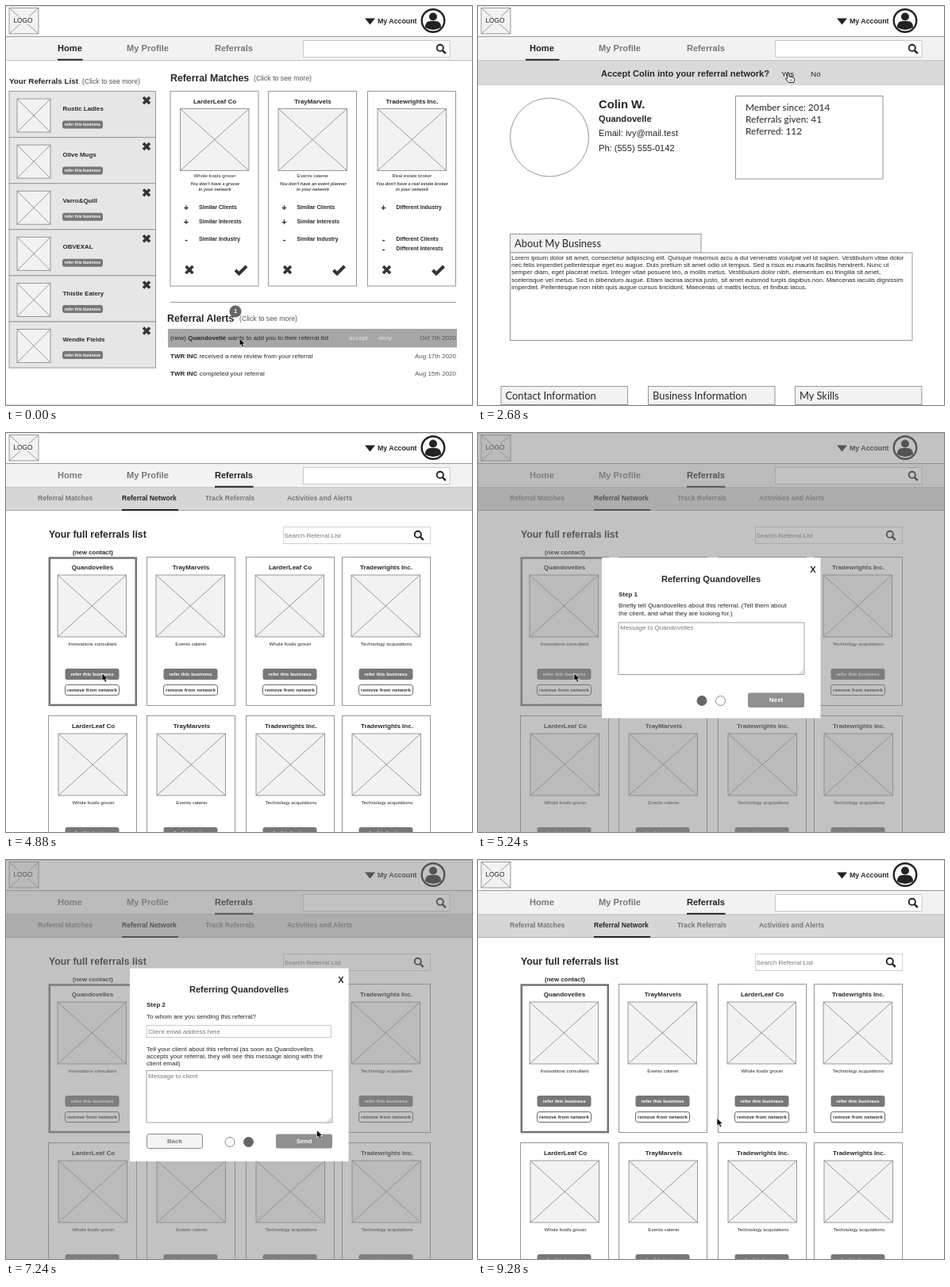
Write an HTML page that moves like this. It is 587 px wide and 503 px high and loops after 9.32 s.

```html
<!DOCTYPE html>
<html lang="en">
<head>
<meta charset="utf-8">
<title>Referral network wireframe</title>
<style>
html, body { margin: 0; width: 100%; height: 100%; overflow: hidden; background: #fff; }
svg { display: block; width: 587px; height: 503px; font-family: "Liberation Sans", Arial, sans-serif; }
.lato { font-family: Lato, sans-serif; }
</style>
</head>
<body>
<svg id="stage" viewBox="0 0 587 503" xmlns="http://www.w3.org/2000/svg"></svg>
<script>
const LOOP = 9320;
const DARK = '#262626', GREY = '#777', LINE = '#969696';

// Drawing helpers; text is placed by its vertical middle
const text = (x, y, size, str, o = {}) =>
  `<text x="${x}" y="${y + size * 0.33}" font-size="${size}" fill="${o.fill || DARK}"` +
  ` text-anchor="${o.anchor || 'start'}" font-weight="${o.bold ? 700 : 400}"` +
  `${o.italic ? ' font-style="italic"' : ''}${o.cls ? ` class="${o.cls}"` : ''}>${str}</text>`;
const bold = (x, y, size, str, o) => text(x, y, size, str, { bold: true, ...o });
const mid = (x, y, size, str, o) => text(x, y, size, str, { anchor: 'middle', ...o });
const midBold = (x, y, size, str, o) => mid(x, y, size, str, { bold: true, ...o });
const box = (x, y, w, h, fill, stroke = 'none', sw = 1, r = 0) =>
  `<rect x="${x}" y="${y}" width="${w}" height="${h}" rx="${r}" fill="${fill}" stroke="${stroke}" stroke-width="${sw}"/>`;
const path = (d, stroke, sw = 1, fill = 'none') =>
  `<path d="${d}" fill="${fill}" stroke="${stroke}" stroke-width="${sw}"/>`;
const circle = (x, y, r, fill, stroke = 'none', sw = 1) =>
  `<circle cx="${x}" cy="${y}" r="${r}" fill="${fill}" stroke="${stroke}" stroke-width="${sw}"/>`;
const picture = (x, y, w, h) => box(x, y, w, h, '#f2f2f2', '#808080', 0.8) +
  path(`M${x} ${y}l${w} ${h}M${x + w} ${y}l${-w} ${h}`, '#808080', 0.8);
const cross = (x, y, r) => path(`M${x - r} ${y - r}l${2 * r} ${2 * r}m0 ${-2 * r}l${-2 * r} ${2 * r}`, '#333', 3.6);
const tick = (x, y) => path(`M${x - 7} ${y + 0.5}l4.5 4.5l9.5 -9.5`, '#333', 4);
const lens = (x, y) => circle(x - 1.2, y - 1.2, 4.1, 'none', '#222', 1.9) +
  path(`M${x + 1.8} ${y + 1.8}l4 4`, '#222', 2.5);
const button = (x, y, w, h, label, size, fill = GREY, color = '#fff', stroke = 'none') =>
  box(x, y, w, h, fill, stroke, 1, 2.8) + midBold(x + w / 2, y + h / 2, size, label, { fill: color });

function header(active, from, to) {
  const tab = (x, label) => midBold(x, 53.5, 11.1, label, { fill: label === active ? '#222' : GREY });
  return box(0, 0, 587, 503, '#fff') + path('M0 .5H587', '#ddd') +
    picture(4, 2.5, 37, 32.5) + box(8, 13.5, 27, 9, '#f2f2f2') + mid(21.5, 18.5, 8.4, 'LOGO') +
    path('M452 15.5h13l-6.5 8z', 'none', 0, '#222') + bold(468, 19, 8.8, 'My Account') +
    circle(538, 18.5, 14.3, '#fff', '#222', 2.4) + circle(538, 13.5, 5, '#222') +
    path('M528 27q0-8 7-8h6q7 0 7 8q-10 6-20 0z', 'none', 0, '#222') +
    box(0, 39, 587, 29.5, '#f2f2f2') + path('M0 38.5H587', '#999') + path('M0 68.5H587', '#c4c4c4') +
    tab(80.5, 'Home') + tab(178.5, 'My Profile') + tab(287, 'Referrals') +
    box(374.5, 43.5, 184.5, 21, '#fff', '#c8c8c8') + lens(548, 54) +
    path(`M${from} 67.7H${to}`, '#222', 2);
}

function homePage() {
  const more = (x, y) => text(x, y, 8.7, '(Click to see more)', { fill: '#555' });
  let s = header('Home', 65, 96.5) + bold(4, 95, 9.8, 'Your Referrals List') + more(96, 95) +
    bold(207, 91, 12.3, 'Referral Matches') + more(312, 91);

  ['Rustic Ladles', 'Olive Mugs', 'Varro&amp;Quill', 'OBVEXAL', 'Thistle Eatery', 'Wendle Fields'].forEach((name, i) => {
    const y = 107.5 + i * 58.1;
    s += box(4, y, 184.5, 58.1, '#e6e6e6', LINE) + picture(14, y + 9.5, 42, 42) +
      bold(71.5, y + 22, 7.9, name) + cross(177, y + 11.5, 4) +
      button(71, y + 37, 51, 10, 'refer this business', 5.1);
  });

  const matches = [
    [207, 'LarderLeaf Co', 'Whole foods grocer', 'a grocer'],
    [330.5, 'TrayMarvels', 'Events caterer', 'an event planner'],
    [455.5, 'Tradewrights Inc.', 'Real estate broker', 'a real estate broker']
  ];
  const shared = [['+', 254, 'Similar Clients'], ['+', 272, 'Similar Interests'], ['-', 294, 'Similar Industry']];
  const differing = [['+', 254, 'Different Industry'], ['-', 294, 'Different Clients'], ['-', 306, 'Different Interests']];
  matches.forEach(([x, name, kind, missing], i) => {
    const cx = x + 56;
    const note = { italic: true, fill: '#444' };
    s += box(x, 107.5, 111, 245.5, '#fff', LINE) + midBold(cx, 120, 8, name) + picture(x + 12.5, 129.5, 86.5, 78) +
      mid(cx, 214, 6.1, kind) + midBold(cx, 224.5, 5.5, `You don't have ${missing}`, note) +
      midBold(cx, 231, 5.5, 'in your network', note);
    for (const [sign, y, label] of i < 2 ? shared : differing)
      s += midBold(x + 20, y + 0.5, 11, sign) + bold(x + 36, y, 6.9, label);
    s += cross(x + 24, 332.5, 4.4) + tick(x + 89, 332.5);
  });

  const date = (y, str) => text(567, y, 8, str, { anchor: 'end', fill: '#555' });
  const strong = str => `<tspan font-weight="700">${str}</tspan>`;
  return s + path('M207 373.5H567', LINE) + bold(203, 393.5, 12.3, 'Referral Alerts') + more(294, 394) +
    circle(289, 385, 7.6, '#666') + midBold(289, 385, 7.5, '1', { fill: '#fff' }) +
    box(204, 407, 364, 23.5, '#a6a6a6') +
    text(207, 418, 8, `(new) ${strong('Quandovelle')} wants to add you to their referral list`) +
    text(432, 418, 8, 'accept', { fill: '#e2e2e2' }) + text(469, 418, 8, 'deny', { fill: '#e2e2e2' }) +
    date(418, 'Oct 7th 2020') +
    text(207, 441, 8, `${strong('TWR INC')} received a new review from your referral`) + date(441, 'Aug 17th 2020') +
    text(207, 463.5, 8, `${strong('TWR INC')} completed your referral`) + date(463.5, 'Aug 15th 2020') +
    path('M0 502.5H587', '#ddd');
}

function profilePage() {
  const lato = (x, y, size, str) => text(x, y, size, str, { cls: 'lato' });
  const panel = (x, y, w, h, label) => box(x, y, w, h, '#f2f2f2', LINE) + lato(x + 5.5, y + 12, 12.9, label);
  const about = [
    'Lorem ipsum dolor sit amet, consectetur adipiscing elit. Quisque maximus arcu a dui venenatis volutpat vel id sapien. Vestibulum vitae dolor',
    'nec felis imperdiet pellentesque eget eu augue. Duis pretium sit amet odio ut tempus. Sed a risus eu mauris facilisis hendrerit. Nunc ut',
    'semper diam, eget placerat metus. Integer vitae posuere leo, a mollis metus. Vestibulum dolor nibh, elementum eu fringilla sit amet,',
    'scelerisque vel metus. Sed in bibendum augue. Etiam lacinia lacinia justo, sit amet euismod turpis dapibus non. Maecenas iaculis dignissim',
    'imperdiet. Pellentesque non nibh quis augue cursus tincidunt. Maecenas ut mattis lectus, et finibus lacus.'
  ];
  return header('Home', 60, 102.5) + box(0, 69, 587, 31, '#d9d9d9') +
    bold(155, 85, 11.1, 'Accept Colin into your referral network?') +
    text(382, 86, 9.9, 'Yes') + text(419, 86, 9.9, 'No') +
    circle(90, 165.5, 49.5, '#fff', LINE) + bold(152, 124, 14.8, 'Colin W.') +
    bold(152, 142, 11.1, 'Quandovelle') + text(152, 160, 11.1, 'Email: ivy@mail.test') +
    text(152, 179, 11.1, 'Ph: (555) 555-0142') +
    box(324.5, 113.5, 185.5, 104.5, '#fff', LINE) + lato(337, 128.5, 11.8, 'Member since: 2014') +
    lato(337, 143.5, 11.8, 'Referrals given: 41') + lato(337, 158.5, 11.8, 'Referred: 112') +
    panel(40.5, 287.5, 240.5, 23.5, 'About My Business') + box(40.5, 311, 506.5, 110.5, '#fff', LINE) +
    about.map((line, i) => text(42, 317 + i * 9.3, 8, line)).join('') +
    panel(29, 479.5, 159.5, 23, 'Contact Information') + panel(214.5, 479.5, 159.5, 23, 'Business Information') +
    panel(399.5, 479.5, 159.5, 23, 'My Skills');
}

function networkPage() {
  const sub = (x, str, on) => bold(x, 82, 8.6, str, { fill: on ? '#222' : GREY });
  let s = header('Referrals', 263, 311.5) + box(0, 69, 587, 28.5, '#d6d6d6') + path('M0 97.5H587', '#a6a6a6') +
    sub(40, 'Referral Matches') + sub(146, 'Referral Network', true) +
    sub(251, 'Track Referrals') + sub(354, 'Activities and Alerts') + path('M146 97H217', '#222', 2) +
    bold(54, 128, 12.3, 'Your full referrals list') + midBold(109.5, 150, 7.9, '(new contact)') +
    box(349.5, 118.5, 185, 21, '#fff', '#d0d0d0') +
    text(350.5, 129, 8.1, 'Search Referral List', { fill: '#777' }) + lens(520, 129);
  const grocer = ['LarderLeaf Co', 'Whole foods grocer'];
  const caterer = ['TrayMarvels', 'Events caterer'];
  const buyer = ['Tradewrights Inc.', 'Technology acquisitions'];
  const rows = [[['Quandovelles', 'Innovations consultant'], caterer, grocer, buyer], [grocer, caterer, buyer, buyer]];
  const columns = [53.5, 177.5, 302.5, 423.5];
  rows.forEach((row, r) => row.forEach(([name, kind], c) => {
    const x = columns[c], y = 156.5 + r * 200, cx = x + 55.5, isNew = !r && !c;
    s += (isNew ? box(x + 1.3, y + 1, 109, 185.5, '#fff', '#777', 2.6) : box(x, y, 111, 187, '#fff', LINE)) +
      midBold(cx + r, y + 12.7, 8, name) + picture(x + 11.5 + r, y + 22.5, 86.5, 78) + mid(cx + r, y + 109.3, 6.1, kind) +
      button(x + 21, y + 140.5, 68, 14, 'refer this business', 6.1) +
      button(x + 21, y + 161, 68, 13, 'remove from network', 6.2, '#fff', '#333', '#666');
  }));
  return s;
}

const dim = () => networkPage() + box(0, 0, 587, 503, 'rgba(133,133,133,.5)');
const field = (x, y, w, h, hint, grip) => box(x, y, w, h, '#fff', grip ? '#a0a0a0' : '#c8c8c8') +
  text(x + 2, y + (grip ? 6.5 : h / 2), 8, hint, { fill: '#777' }) +
  (grip ? path(`M${x + w - 6} ${y + h - 1}l5-5m-2 5l2-2`, '#888', 0.7) : '');
const dots = (y, step) => [282, 305.5].map((x, i) =>
  circle(x, y, 6, i + 1 === step ? '#666' : '#fff', i + 1 === step ? '#666' : '#888')).join('');
const dialog = (y, h, step) => box(156, y, 275.5, h, '#fff') +
  midBold(293.5, y + 27, 11.1, 'Referring Quandovelles') + midBold(422, y + 15, 11, 'X') +
  bold(177, y + 46, 8, `Step ${step}`);

const stepOne = () => dim() + dialog(157, 202.5, 1) +
  text(177, 217.7, 8, 'Briefly tell Quandovelles about this referral. (Tell them about') +
  text(177, 227, 8, 'the client, and what they are looking for.)') +
  field(177, 239, 234, 65.5, 'Message to Quandovelles', true) + dots(337.5, 1) +
  button(340, 327.5, 71, 18.5, 'Next', 8, '#8f8f8f');

const stepTwo = () => dim() + dialog(136.5, 243.5, 2) +
  text(177, 197.5, 8, 'To whom are you sending this referral?') +
  field(177, 208.5, 232.5, 15, 'Client email address here') +
  text(177, 238, 8, 'Tell your client about this referral (as soon as Quandovelles') +
  text(177, 247.3, 8, 'accepts your referral, they will see this message along with the') +
  text(177, 256.6, 8, 'client email)') + field(177, 265.5, 234, 65.5, 'Message to client', true) + dots(355.5, 2) +
  button(177.5, 345.5, 70, 18, 'Back', 8, '#f4f4f4', '#777', '#888') + button(340, 345.5, 71, 18, 'Send', 8, '#8f8f8f');

const success = () => dim() + box(170.5, 160.5, 246, 196, '#fff', '#999') +
  circle(290.5, 191, 13.8, '#fff', '#222', 3.6) + path('M283.5 191.5l5 5l9-9.5', '#222', 4.2) +
  midBold(290.5, 224.2, 11.1, 'Success!') + mid(293.5, 249.6, 11.1, 'You message has been sent.') +
  mid(293.5, 275.5, 11.1, 'You will receive an alert when') +
  mid(293.5, 288.7, 11.1, 'Quandovelle accepts your referral.') +
  button(251, 314.5, 86.5, 24.5, 'OK', 8);

// Scene starts, in ms
const scenes = [
  [0, homePage()], [560, profilePage()], [3080, networkPage()], [4960, stepOne()],
  [6240, stepTwo()], [7800, success()], [8800, networkPage()]
];
// Pointer stops: time, x, y
const stops = [
  [0, 294, 419], [900, 294, 419], [1500, 281, 363.5], [1800, 281, 363.5], [2680, 391, 84], [3880, 391, 84],
  [4640, 121, 303], [5280, 121, 303], [5800, 385, 337], [6500, 385, 337], [7000, 391.5, 340.5],
  [7800, 391.5, 340.5], [8000, 386.5, 347], [8320, 386.5, 347], [8600, 301, 329], [8760, 301, 325.5], [LOOP, 301, 325.5]
];

const arrow = path('M0 0V9.6L2.2 7.5L3.9 11.2L5.8 10.3L4.2 6.9H7.3Z', '#fff', 0.7, '#000');
const hand = path('M-1 0q1.2-1 2 .5V5l5 1.2q2 .6 1.7 2.5L6.7 12.5H.5L-3.6 7.8q.5-1.6 2.4 0z', '#222', 1, '#fff') +
  path('M2.2 8.2v2.5M4.2 8.2v2.5', '#222', 0.7);

const stage = document.getElementById('stage');
stage.innerHTML = scenes.map(([, markup]) => `<g>${markup}</g>`).join('') +
  `<g id="pointer"><g>${arrow}</g><g>${hand}</g></g>`;
const layers = [...stage.children].slice(0, scenes.length);
const pointer = document.getElementById('pointer');
const show = (node, on) => node.setAttribute('display', on ? 'inline' : 'none');

function pointerAt(t) {
  const i = stops.findIndex(stop => stop[0] > t);
  const [t0, x0, y0] = stops[i - 1], [t1, x1, y1] = stops[i];
  const u = (t - t0) / (t1 - t0), e = u * u * (3 - 2 * u);
  return [x0 + (x1 - x0) * e, y0 + (y1 - y0) * e];
}

function render(t) {
  const current = scenes.filter(([start]) => start <= t).length - 1;
  layers.forEach((layer, i) => show(layer, i === current));
  const onLink = t >= 2640 && t < 3940;
  show(pointer.children[0], !onLink);
  show(pointer.children[1], onLink);
  pointer.setAttribute('transform', `translate(${pointerAt(t)})`);
}

const begin = performance.now();
function tickFrame() {
  render((performance.now() - begin) % LOOP);
  requestAnimationFrame(tickFrame);
}
tickFrame();
</script>
</body>
</html>
```
